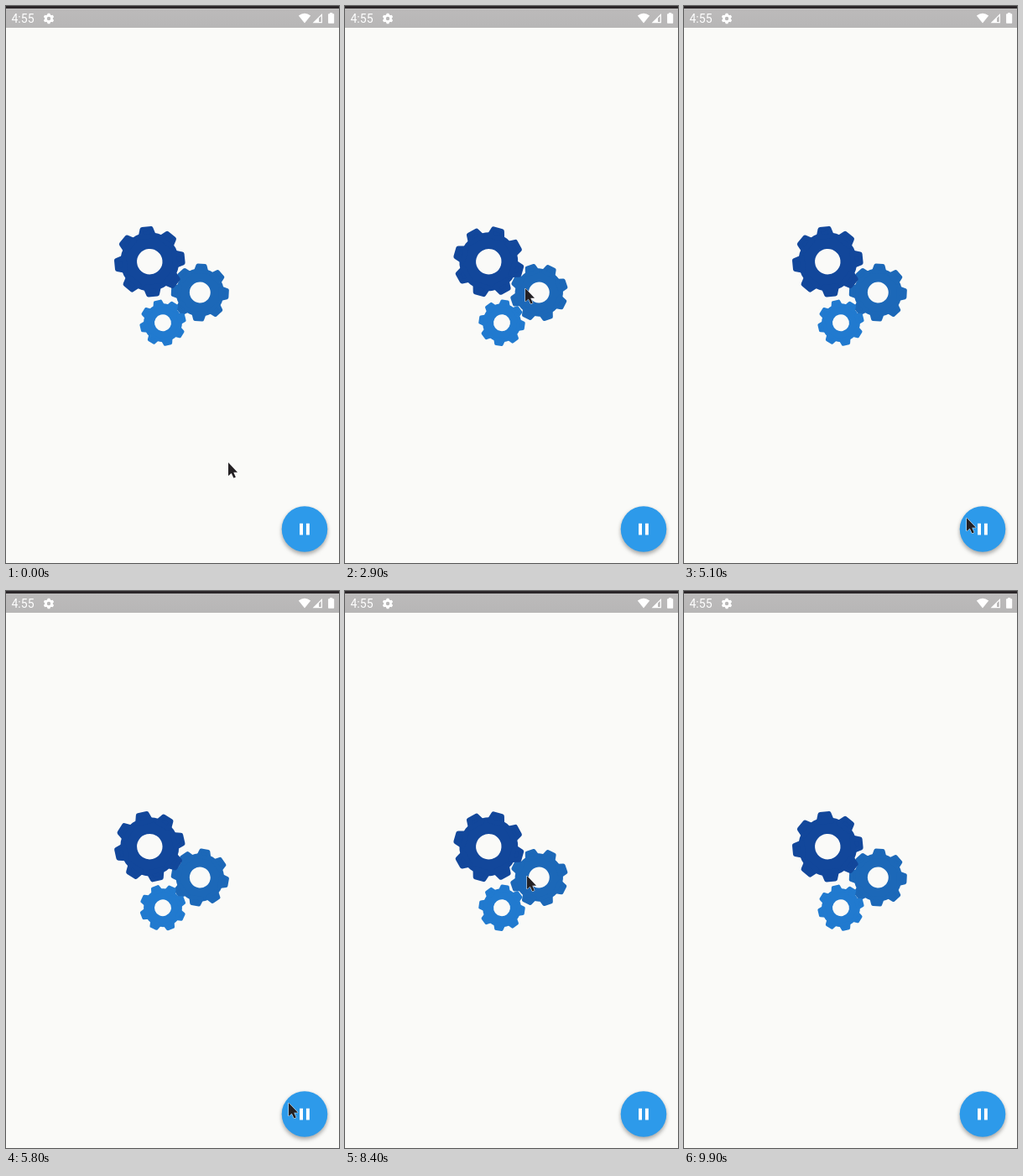
Write an HTML page that moves like this. It is 397 by 665 pixels and loops after 10000 ms.

```html
<!DOCTYPE html>
<html lang="en">
<head>
<meta charset="utf-8">
<title>Gears</title>
<style>
  html, body { margin: 0; width: 100%; height: 100%; overflow: hidden; background: #fafaf8; }
  svg { display: block; width: 397px; height: 665px; }
  text { font: 14px Roboto, Arial, sans-serif; fill: #fff; }
</style>
</head>
<body>
<svg viewBox="0 0 397 665">
  <defs>
    <linearGradient id="bar" x2="0" y2="1">
      <stop stop-color="#bdbbbb"/><stop offset="1" stop-color="#b7b6b6"/>
    </linearGradient>
    <clipPath id="disc"><circle cx="356" cy="624.5" r="27.3"/></clipPath>
  </defs>
  <rect width="397" height="665" fill="#fafaf8"/>
  <rect width="397" height="26" fill="url(#bar)"/>
  <rect width="397" height="3" fill="#2b2629"/>

  <g fill="#fff">
    <text x="6.5" y="20">4:55</text>
    <g id="cog" transform="translate(51 15)"></g>
    <path d="M348.8 11.6Q356 6 363.2 11.6L356 20.5Z"/>
    <path d="M377 9V20.3H365.6Z M375.8 12V19.1H373V14.6Z" fill-rule="evenodd"/>
    <path d="M386 9.2V8H389.2V9.2H390.6Q391.2 9.2 391.2 9.8V20Q391.2 20.7 390.6 20.7H384.7Q384.1 20.7 384.1 20V9.8Q384.1 9.2 384.7 9.2Z"/>
  </g>

  <g id="gears"></g>

  <circle id="fab" cx="356" cy="624.5" r="27.3" fill="#2d9aea"/>
  <circle id="ripple" cx="338" cy="612" fill="#fff" clip-path="url(#disc)"/>
  <path id="icon" fill="#fff" transform="translate(344.2 612.8) scale(.98)"/>

  <path id="cursor" d="M0 0V16L3.7 12.7L6.4 18.6L8.9 17.5L6.3 11.7H11Z"
        fill="#242124" stroke="#fff" stroke-width="1" stroke-linejoin="round" paint-order="stroke"/>
</svg>
<script>
const LOOP = 10000, STEP = 100, RESTART = 5100;
const PAUSE = 'M6 5H10V19H6ZM14 5H18V19H14Z', PLAY = 'M8 5V19L19 12Z';
const $ = id => document.getElementById(id);
const clamp = x => Math.min(1, Math.max(0, x));
const smooth = x => x * x * (3 - 2 * x);
const cubic = x => x < .5 ? 4 * x ** 3 : 1 - 4 * (1 - x) ** 3;

// Rows are [time, ...values]; each span is eased.
function track(rows, t, ease) {
  let i = 0;
  while (i < rows.length - 2 && t >= rows[i + 1][0]) i++;
  const [a, b] = [rows[i], rows[i + 1]];
  const k = ease(clamp((t - a[0]) / (b[0] - a[0])));
  return a.slice(1).map((v, j) => v + (b[j + 1] - v) * k);
}

function add(parent, name, attrs) {
  const el = document.createElementNS('http://www.w3.org/2000/svg', name);
  for (const key in attrs) el.setAttribute(key, attrs[key]);
  return parent.appendChild(el);
}

const ring = (r, h) =>
  `M${r} 0A${r} ${r} 0 1 1 ${-r} 0A${r} ${r} 0 1 1 ${r} 0Z` +
  `M${h} 0A${h} ${h} 0 1 1 ${-h} 0A${h} ${h} 0 1 1 ${h} 0Z`;

function gear(parent, color, scale) {
  const g = add(parent, 'g', { fill: color, stroke: color });
  const s = add(g, 'g', { transform: `scale(${scale})` });
  add(s, 'path', { d: ring(35, 15.2), 'fill-rule': 'evenodd', stroke: 'none' });
  for (let i = 0; i < 8; i++)
    add(s, 'path', {
      d: 'M-8 -30L-5.2 -39.2H5.2L8 -30Z', transform: `rotate(${i * 45})`,
      'stroke-width': 5.6, 'stroke-linejoin': 'round'
    });
  return g;
}

// x, y, scale, start angle, direction, colour
const gears = [
  [231.3, 342, .818, 3, -1, '#1c68b8'],
  [171.3, 305.2, 1, -5.6, 1, '#12479b'],
  [187, 378.2, .655, -13.5, 1, '#217acf']
].map(([x, y, scale, start, dir, color]) => ({ x, y, start, dir, el: gear($('gears'), color, scale) }));

const cog = $('cog');
add(cog, 'path', { d: ring(4.9, 2.2), 'fill-rule': 'evenodd' });
for (let i = 0; i < 6; i++)
  add(cog, 'path', { d: 'M-2 -4L-1.3 -6.3H1.3L2 -4Z', transform: `rotate(${i * 60})` });

const TURN = [[0, 0], [800, 83.6], [1600, 83.6], [2400, 201.6], [3300, 201.6], [4800, 360], [5000, 360]];
const MOUSE = [
  [0, 265, 545], [850, 215, 337], [2900, 215, 337], [3900, 337, 611],
  [6250, 337, 611], [7250, 217, 340], [8400, 217, 340], [9250, 78, 46], [LOOP, 78, 46]
];
const PRESS = [[0, 0], [3950, 0], [4150, 1], [4350, 0], [4750, 0], [4900, 1], [5080, 0], [LOOP, 0]];

function draw(t) {
  // The gears freeze while paused and begin again after the second tap.
  const u = t < 5000 ? Math.min(t, 4300) : Math.max(0, t - RESTART);
  const [angle] = track(TURN, u, cubic);
  for (const g of gears)
    g.el.setAttribute('transform', `translate(${g.x} ${g.y}) rotate(${g.start + g.dir * angle})`);

  const [x, y] = track(MOUSE, t, smooth);
  $('cursor').setAttribute('transform', `translate(${x} ${y})`);
  $('cursor').style.display = t < 9300 ? '' : 'none';

  const [p] = track(PRESS, t, smooth);
  const since = t >= 4750 ? t - 4750 : t - 3950;
  $('ripple').setAttribute('r', 50 * clamp(since / 300));
  $('ripple').setAttribute('opacity', .22 * p);
  $('fab').style.filter =
    `drop-shadow(0 ${3 + p * 2}px ${2.5 + p}px rgba(0,0,0,.27)) drop-shadow(0 1px 2px rgba(0,0,0,.1))`;
  $('icon').setAttribute('d', t >= 4200 && t < 5000 ? PLAY : PAUSE);
}

const begin = performance.now();
function tick() {
  const t = (performance.now() - begin) % LOOP;
  draw(Math.floor(t / STEP) * STEP);
  requestAnimationFrame(tick);
}
draw(0);
requestAnimationFrame(tick);
</script>
</body>
</html>
```
